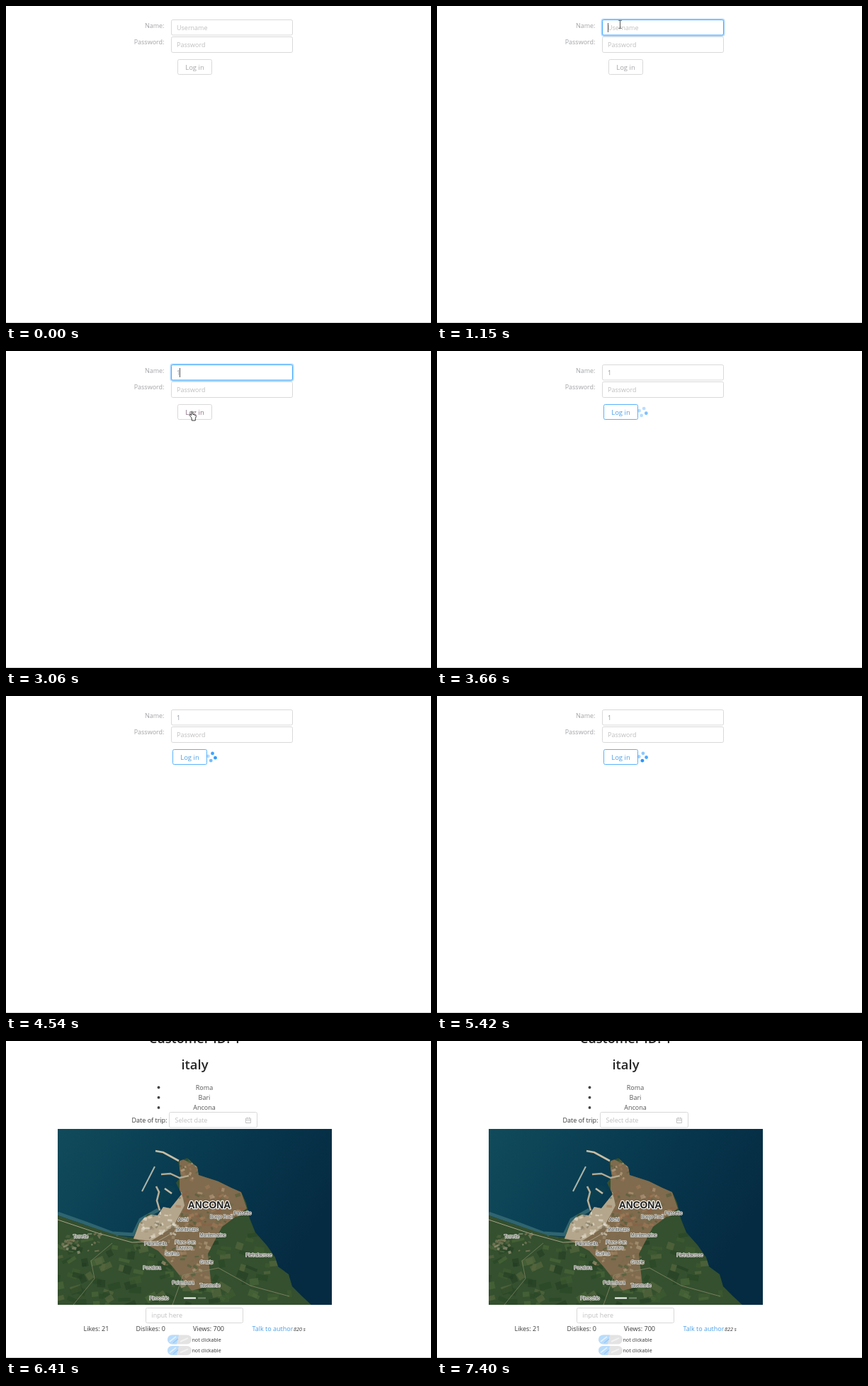
An HTML page for the animation above (8000 ms loop, 600 by 447 pixels).

```html
<!DOCTYPE html>
<html lang="en">
<head>
<meta charset="utf-8">
<title>Login and trip page</title>
<style>
  html, body { margin: 0; width: 100%; height: 100%; overflow: hidden; background: #fff; }
  svg { display: block; width: 600px; height: 447px; }
  text { font-family: "Open Sans", "Noto Sans", sans-serif; font-size: 9px; white-space: pre; }
  .map text { font-family: "Liberation Sans", Arial, sans-serif; font-size: 6.4px; fill: #444;
    stroke: #e3e3dc; stroke-width: 1.5px; stroke-linejoin: round; paint-order: stroke; text-anchor: middle; }
  .map .city { font-size: 13.8px; font-weight: bold; fill: #1c1c1c; stroke: #f4f4f0; stroke-width: 2.6px; }
</style>
</head>
<body>
<svg id="stage" viewBox="0 0 600 447" xmlns="http://www.w3.org/2000/svg"></svg>
<script>
const LOOP = 8000, PAGE = 5540, LOADED = 6070, LOADING = 3410;
const GREY = '#d9d9d9', HINT = '#bfbfbf', FADED = '#a4a5a9', INK = '#3a3a3a', BLUE = '#1890ff';

let seed = 11;
const rnd = () => (seed = seed * 16807 % 2147483647) / 2147483647;
const pick = list => list[Math.floor(rnd() * list.length)];

const text = (x, y, str, fill = INK, attrs = '') =>
  `<text x="${x}" y="${y}" fill="${fill}" ${attrs}>${str}</text>`;
const box = (x, y, w, h, attrs = '') =>
  `<rect x="${x}" y="${y}" width="${w}" height="${h}" rx="2" fill="#fff" stroke="${GREY}" ${attrs}/>`;
const shape = (points, fill, attrs = '') => `<polygon points="${points}" fill="${fill}" ${attrs}/>`;
const line = (points, stroke, width) =>
  `<polyline points="${points}" fill="none" stroke="${stroke}" stroke-width="${width}"/>`;
const spinner = id => `<g id="${id}">${'<circle r="2.4" fill="#1890ff"/>'.repeat(4)}</g>`;
const END = 'text-anchor="end"', MID = 'text-anchor="middle"';

// Scattered irregular patches inside an ellipse
function patches(count, cx, cy, rx, ry, size, colors) {
  let out = '';
  for (let i = 0; i < count; i++) {
    const a = rnd() * 2 * Math.PI, d = Math.sqrt(rnd());
    const x = cx + rx * d * Math.cos(a), y = cy + ry * d * Math.sin(a);
    const w = size * (.4 + rnd()), h = size * (.3 + rnd() * .6);
    out += `<rect x="${x.toFixed(1)}" y="${y.toFixed(1)}" width="${w.toFixed(1)}" height="${h.toFixed(1)}"
      fill="${pick(colors)}" opacity=".6" transform="rotate(${Math.round(rnd() * 70 - 35)} ${x.toFixed(1)} ${y.toFixed(1)})"/>`;
  }
  return out;
}

const COAST = '73,246 105,257 135,267 160,275 180,277 187,258 200,244 214,246 222,234 232,236 248,216 240,200 ' +
  '247,191 243,170 256,165 270,178 272,189 300,198 318,207 332,213 339,228 344,250 352,270 368,288 380,305 ' +
  '384,318 399,329 404,346 418,360 432,373 73,373';
const PLACES = [['Archi', 250, 254], ['Borgo Rodi', 304, 250], ['Passetto', 334, 245], ['Montirozzo', 256, 268],
  ['Montemarino', 292, 276], ['Torrette', 105.5, 278], ['Palombella', 211, 288], ['Piano San', 253, 286],
  ['Lazzaro', 252, 294], ['Scrima', 234, 302], ['Grazie', 283, 314], ['Pietralacroce', 357, 304],
  ['Posatora', 206, 322], ['Palombara', 250, 343], ['Tavernelle', 288, 347], ['Pinocchio', 216, 365]];

const map = () => `<g class="map" clip-path="url(#frame)">
  <rect x="73" y="124" width="387" height="248" fill="url(#sea)"/>
  ${line('73,243 110,256 150,271 180,273 190,252 215,238', '#2f6570', 5)}
  <g clip-path="url(#land)">
    <rect x="73" y="124" width="387" height="248" fill="#34502e"/>
    ${patches(150, 230, 325, 200, 65, 13, ['#274526', '#3f5d33', '#4d6a3b', '#223d22', '#5a6a42'])}
    ${shape('180,277 214,240 245,212 245,165 270,176 300,198 332,213 340,236 305,262 285,300 290,345 262,352 235,318 215,296', '#806b4e')}
    ${shape('180,279 190,252 214,240 248,213 252,232 236,262 205,282', '#b3a68c')}
    ${patches(90, 285, 232, 48, 32, 6, ['#a27b58', '#8c5f43', '#6b6a48', '#b79c7d', '#4f5b38'])}
    ${patches(65, 253, 305, 36, 46, 6, ['#a18463', '#7c6a4c', '#49603a', '#b5a081'])}
    ${patches(50, 214, 260, 30, 20, 5, ['#d6cdb8', '#a3937a', '#ece5d6', '#78705a'])}
    ${patches(22, 257, 178, 13, 18, 5, ['#c4ab8a', '#9b7b5c', '#55633f'])}
    ${patches(28, 104, 284, 34, 16, 5, ['#b0a78e', '#8f8467', '#5e6c46'])}
    ${line('73,252 130,271 178,284 215,282 250,262', '#a6a086', 1)}
    ${line('95,372 125,335 120,310 150,285', '#7d8260', .8)}
    ${line('235,372 250,330 300,320 345,345 400,360', '#8b8868', .8)}
  </g>
  ${shape('213,213 232,203 240,208 229,224 219,230', '#0b3f50')}
  ${line('211,155 222,157 244,169', '#c9bda2', 2.6)}
  ${line('210,177 192,212', '#aeb5a8', 2)}
  ${line('219,188 232,187 245,193 258,190', '#b6a98e', 2.4)}
  ${line('212,205 216,213 213,225 217,239', '#b9ae96', 2.6)}
  ${line('224,208 234,215', '#c5bba4', 2.6)}
  ${PLACES.map(([name, x, y]) => `<text x="${x}" y="${y}">${name}</text>`).join('')}
  <text class="city" x="287" y="235.5" textLength="">ANCONA</text>
  <rect x="251" y="361.5" width="17" height="2" fill="#fff"/>
  <rect x="271" y="361.5" width="11" height="2" fill="#fff" opacity=".3"/>
</g>`.replace(' textLength=""', '');

const pill = y => `<rect x="228" y="${y - 6.5}" width="34" height="13" rx="6.5" fill="#e3e3e4"/>
  <path d="M234.5 ${y - 6.5}H244L241 ${y + 6.5}H234.5A6.5 6.5 0 0 1 234.5 ${y - 6.5}Z" fill="#b9dcfb"/>
  ${line(`231,${y + 3} 240,${y - 4}`, '#e6f3ff', 1.5)}${line(`236,${y + 5} 243,${y - 1}`, '#8fc6f7', 1.2)}
  ${line(`246,${y + 3} 257,${y - 2}`, '#f2f2f2', 2)}
  ${text(262.5, y + 2.8, 'not clickable', '#333', 'style="font-size:7.1px"')}`;

const stage = document.getElementById('stage');
stage.innerHTML = `
<defs>
  <linearGradient id="sea" x2="1" y2=".4"><stop offset="0" stop-color="#114b5b"/>
    <stop offset=".5" stop-color="#083a50"/><stop offset="1" stop-color="#052b42"/></linearGradient>
  <clipPath id="frame"><rect x="73" y="124" width="387" height="248"/></clipPath>
  <clipPath id="land"><polygon points="${COAST}"/></clipPath>
</defs>
<g id="login">
  ${text(223.5, 30.5, 'Name:', FADED, END)}${text(223.5, 54, 'Password:', FADED, END)}
  <rect id="glow" x="232.5" y="18.5" width="173" height="23.5" rx="3" fill="none" stroke="${BLUE}" stroke-opacity=".3" stroke-width="2"/>
  ${box(233.5, 19.5, 171, 21.5, 'id="name"')}${box(233.5, 43.5, 171, 22)}
  ${text(241, 34, 'Username', HINT, 'id="hint"')}${text(241, 34, '1', '#8f969e', 'id="typed"')}
  <rect id="caret" y="24" width="1" height="13" fill="#555"/>
  ${text(241, 58, 'Password', HINT)}
  <g id="button">${box(242.5, 75.5, 48, 21, 'id="edge"')}${text(266.5, 89.8, 'Log in', FADED, 'id="label" text-anchor="middle" style="font-size:9.5px"')}</g>
  ${spinner('busy')}
  <g id="arrow"><path d="M.5 .5V10.5L3 8.2L4.7 12L6.3 11.3L4.7 7.7H8Z" fill="#fff" stroke="#222" stroke-width=".8"/></g>
  <g id="beam"><path d="M-2 -5.5H-.5L0 -5L.5 -5.5H2M0 -5V5M-2 5.5H-.5L0 5L.5 5.5H2" fill="none" stroke="#444" stroke-width=".9"/></g>
  <g id="hand"><path d="M-1 8.5L-3.6 5.4Q-3.8 4 -2.4 4.4L-1 5.8V.8Q0 -.6 1 .8V4.2L5 5.4Q6 5.8 5.8 7.5L4.8 10.5V13H-.2V11Z" fill="#fff" stroke="#222" stroke-width=".9"/></g>
</g>
<g id="trip">
  ${text(266.5, 3, 'Customer ID: 1', '#262626', MID + ' style="font-size:18.2px;font-weight:600"')}
  ${text(266.5, 40, 'italy', '#262626', MID + ' style="font-size:18.4px;font-weight:600"')}
  ${['Roma', 'Bari', 'Ancona'].map((city, i) => `<circle cx="215.5" cy="${65.5 + 14.2 * i}" r="1.9" fill="#444"/>` +
    text(280, 69 + 14.2 * i, city, '#555', MID)).join('')}
  ${text(177.5, 115, 'Date of trip:')}${box(230.5, 100.5, 124, 21.5)}${text(238.5, 115, 'Select date', HINT)}
  <path d="M338.5 109H345.5V115.5H338.5ZM338.5 111.5H345.5M340.5 107.5V110M343.5 107.5V110" fill="none" stroke="${HINT}" stroke-width=".9"/>
  ${map()}
  ${spinner('wait')}
  <g id="answer">${box(197.5, 376.5, 137, 21)}${text(205.5, 390.3, 'input here', HINT)}</g>
  <g id="footer">
    ${text(109.5, 404.6, 'Likes: 21')}${text(183.5, 404.6, 'Dislikes: 0')}${text(264, 404.6, 'Views: 700')}
    ${text(347.5, 404.6, 'Talk to author', '#4a9fe6')}
    ${text(406, 404.6, '', '#333', 'id="age" style="font-size:7.2px;font-style:italic"')}
    ${pill(416.3)}${pill(431.8)}
    ${text(150, 450, 'This coutry is fine, <tspan font-style="italic">(First customer\'s footer for countries!)</tspan>')}
  </g>
</g>
<rect y="446" width="600" height="1" fill="#d2d2d2"/>`;

const el = id => document.getElementById(id);
const show = (id, on) => el(id).setAttribute('display', on ? 'inline' : 'none');
const move = (id, x, y) => el(id).setAttribute('transform', `translate(${x} ${y})`);
const clamp = v => Math.max(0, Math.min(1, v));
const ramp = (t, from, to) => clamp((t - from) / (to - from));
const within = (t, from, to) => t >= from && t < to;
const mix = (a, b, k) => {
  const part = (c, i) => parseInt(c.slice(i, i + 2), 16);
  return `rgb(${[1, 3, 5].map(i => Math.round(part(a, i) + (part(b, i) - part(a, i)) * k))})`;
};
const tick = t => 3405 + 125.2 * Math.floor((t - 3405) / 125.2);

// [time, pointer, x, y]
const POINTER = [[0, ''], [110, 'arrow', 372, 293], [170, 'arrow', 284, 152], [400, 'arrow', 280, 124],
  [525, 'arrow', 271, 64], [650, 'beam', 262, 38], [775, 'beam', 259, 29], [900, 'beam', 258.5, 26],
  [2780, 'arrow', 258, 50], [2900, 'arrow', 259, 75], [3060, 'hand', 262.5, 85], [3530, '']];

function drawSpinner(id, cx, cy, age) {
  [...el(id).children].forEach((dot, i) => {
    const angle = age / 1200 * 2 * Math.PI + i * Math.PI / 2;
    const phase = Math.max(0, age - 400 * i) / 1000 % 2;
    dot.setAttribute('cx', cx + 5.2 * Math.sin(angle));
    dot.setAttribute('cy', cy - 5.2 * Math.cos(angle));
    dot.setAttribute('opacity', .3 + .7 * (1 - Math.abs(1 - phase)));
  });
}

function draw(t) {
  const onTrip = t >= PAGE, loading = t >= LOADING, loaded = t >= LOADED, typed = t >= 1900;
  show('login', !onTrip);
  show('trip', onTrip);

  const step = tick(t);
  const leave = ramp(step, 3150, 3400);
  el('name').setAttribute('stroke', mix(GREY, '#40a9ff', ramp(step, 600, 880) * (1 - leave)));
  el('glow').setAttribute('opacity', t < 1040 ? 0 : t < 1150 ? .5 : 1 - leave);
  show('hint', !typed);
  show('typed', typed);
  show('caret', within(t, 1040, 1530) || within(t, 1900, 2530) || within(t, 3060, 3170));
  el('caret').setAttribute('x', typed ? 245 : 241);

  const hover = ramp(step, 3050, 3350);
  el('edge').setAttribute('stroke', mix(GREY, '#58b2fb', hover));
  el('label').setAttribute('fill', within(t, 3060, 3170) ? '#8a6f84' : mix(FADED, '#4a9fe6', hover));
  move('button', loading ? -7 : 0, 0);
  show('busy', loading);
  drawSpinner('busy', 290.4, 86, step - 3290);

  const [, pointer, x, y] = POINTER.filter(p => p[0] <= t).pop();
  for (const id of ['arrow', 'beam', 'hand']) show(id, id === pointer);
  if (pointer) move(pointer, x, y);

  show('wait', onTrip && !loaded);
  drawSpinner('wait', 266, 383.6, Math.max(0, step - 5395));
  show('answer', loaded);
  move('footer', 0, loaded ? 4.6 : 0);
  el('age').textContent = (t < 6420 ? 820 : t < 7400 ? 821 : 822) + ' s';
}

const start = performance.now();
function frame() {
  draw((performance.now() - start) % LOOP);
  requestAnimationFrame(frame);
}
frame();
</script>
</body>
</html>
```
